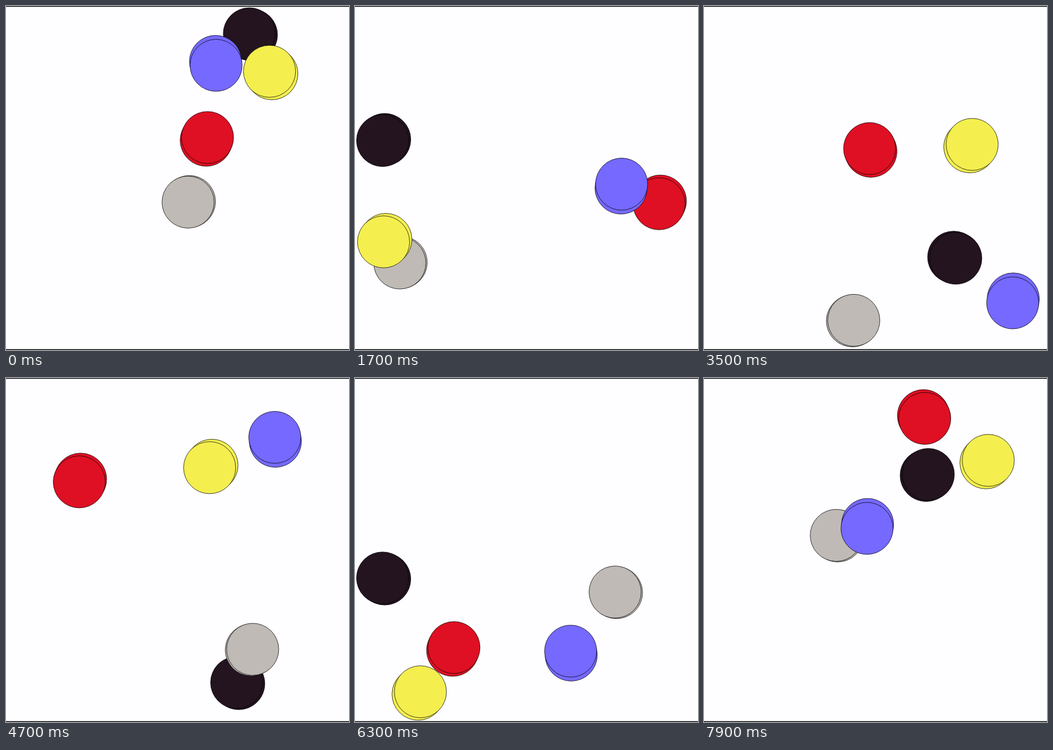
These frames come from a looping animation (600 px wide and 603 px high, 8 s). An HTML page with a canvas:

```html
<!DOCTYPE html>
<html lang="en">
<head>
<meta charset="utf-8">
<title>Bouncing discs</title>
<style>
  html, body { margin: 0; width: 100%; height: 100%; overflow: hidden; background: #fefdff; }
  canvas { display: block; }
</style>
</head>
<body>
<canvas id="stage" width="600" height="603"></canvas>
<script>
const ctx = document.getElementById('stage').getContext('2d');
const W = 600, H = 603, RADIUS = 45.6;
const LOOP = 8000, TICK = 100, STEPS_PER_TICK = 5.985;

// Limits for the disc centres.
const WALLS = { left: 44.9, right: 554.8, top: 46.4, bottom: 556.5 };

// Start position and velocity per step, from back to front.
const BALLS = [
  { fill: '#231420', x: 425.65, y: 48.7, vx: -3.7, vy: -1.91 },
  { fill: '#bfbab5', x: 318.5, y: 343.8, vx: -2.354, vy: 1.046 },
  { fill: '#f4ef4f', x: 461, y: 114.5, vx: -4.03, vy: -4.27 },
  { fill: '#df1023', x: 352.5, y: 230.5, vx: 2.243, vy: -4.84 },
  { fill: '#7569ff', x: 367.5, y: 104, vx: 0.969, vy: 6.94 }
];

// Moves one coordinate for a number of steps; returns its last two values.
function bounce(pos, vel, low, high, steps) {
  let prev = pos - vel;
  for (let i = 0; i < steps; i++) {
    prev = pos;
    pos += vel;
    if (pos < low || pos > high) vel = -vel;
  }
  return [prev, pos];
}

function disc(x, y, fill) {
  ctx.beginPath();
  ctx.arc(x, y, RADIUS, 0, Math.PI * 2);
  ctx.fillStyle = fill;
  ctx.fill();
  ctx.stroke();
}

function draw(time) {
  const tick = Math.floor(time / TICK);
  const steps = Math.ceil(tick * STEPS_PER_TICK);

  ctx.fillStyle = '#fefdff';
  ctx.fillRect(0, 0, W, H);
  ctx.strokeStyle = 'rgba(0, 0, 0, 0.75)';
  ctx.lineWidth = 1;
  for (const b of BALLS) {
    const xs = bounce(b.x, b.vx, WALLS.left, WALLS.right, steps);
    const ys = bounce(b.y, b.vy, WALLS.top, WALLS.bottom, steps);
    // Each disc leaves its previous step showing behind it.
    xs.forEach((x, i) => disc(x, ys[i], b.fill));
  }

  ctx.fillStyle = '#000';
  ctx.fillRect(0, 0, W, 1.3);
  ctx.fillRect(0, 601.6, W, 1.4);
}

const start = performance.now();
function loop(now) {
  draw(Math.max(0, now - start) % LOOP);
  requestAnimationFrame(loop);
}
draw(0);
requestAnimationFrame(loop);
</script>
</body>
</html>
```
